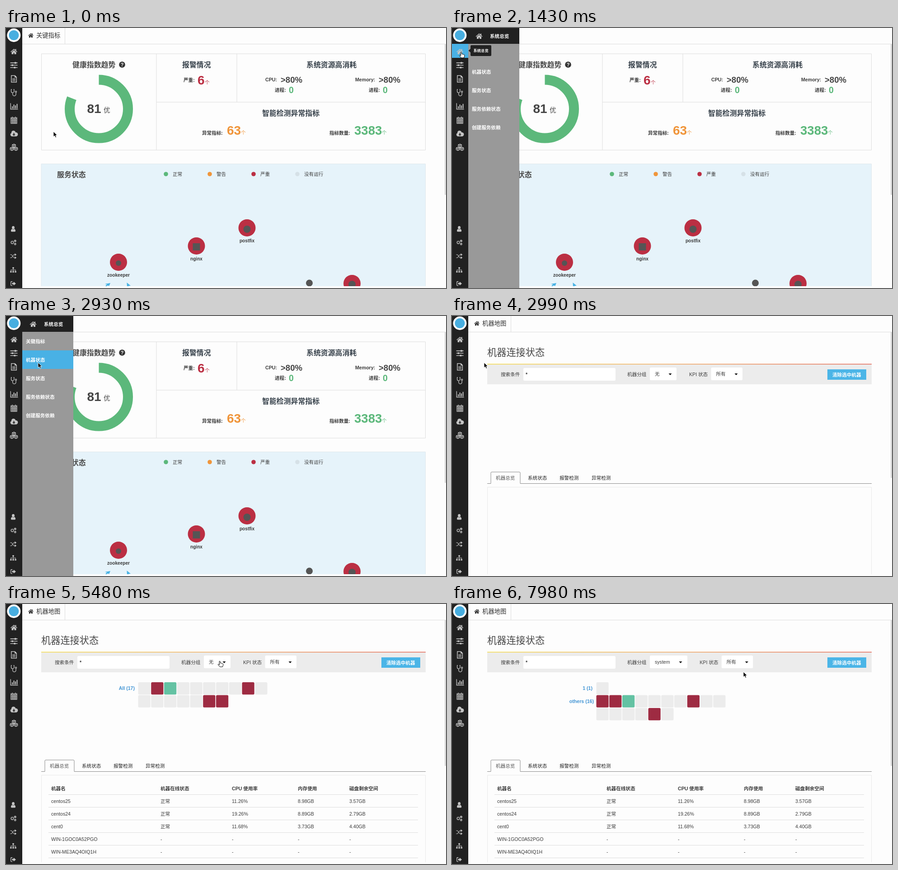
An HTML page for the animation above (8 s loop, 974 by 575 pixels).

```html
<!DOCTYPE html>
<html lang="zh-CN">
<head>
<meta charset="utf-8">
<title>系统总览</title>
<style>
html, body { margin: 0; width: 100%; height: 100%; overflow: hidden; background: #fdfdfd; }
svg { display: block; }
#stage { width: 974px; height: 575px; font: 10.6px "Liberation Sans", "Noto Sans CJK SC", "Noto Sans CJK", sans-serif; fill: #3a3a3a; }
.b { font-weight: bold; }
.m { font-weight: 500; }
.mid { text-anchor: middle; }
.end { text-anchor: end; }
.h { font-size: 15.9px; font-weight: bold; fill: #36404a; }
.tab { font-size: 13.3px; fill: #333; }
.num { font-size: 28px; font-weight: bold; }
.pct { font-size: 18.6px; font-weight: bold; fill: #444; }
.zero { font-size: 19.5px; font-weight: bold; }
.green { fill: #5cb87b; }
.orange { fill: #f0953a; }
.red { fill: #bb2f43; }
.white { fill: #fff; }
.line { fill: none; stroke: #ddd; }
.icon { color: #c4c4c4; fill: currentColor; fill-rule: evenodd; }
.icon .s { fill: none; stroke: currentColor; stroke-width: 1.3; }

/* Everything runs on one 8 s clock; 1% is 80 ms. */
.k { opacity: 0; animation: 8s step-end infinite; }
#home { animation-name: home; }
#machines { animation-name: machines; }
.late { animation-name: late; }
#menu { animation-name: menu; }
#hover { animation-name: hover; }
.tip { animation-name: tip; }
#none { animation-name: none-chosen; }
#system { animation-name: system-chosen; }
#drop { animation-name: drop; }
#pick { animation-name: pick; }
#all { animation-name: all; }
#ring { animation-name: ring; }
#grouped { animation-name: grouped; }
#arrow { animation-name: arrow; }
#hand { animation-name: hand; }
#beam { animation-name: beam; }
#kpi { animation: kpi 8s step-end infinite; }
#cursor { animation: move 8s linear infinite; }

@keyframes home { 0% { opacity: 1 } 37.375%, 100% { opacity: 0 } }
@keyframes machines { 37.375%, 100% { opacity: 1 } }
@keyframes late { 38.125%, 100% { opacity: 1 } }
@keyframes menu { 16.375% { opacity: 1 } 37.375%, 100% { opacity: 0 } }
@keyframes tip { 13.5% { opacity: 1 } 21.6%, 100% { opacity: 0 } }
@keyframes hover {
  21.6% { opacity: 1; transform: translateY(0) }
  23.25% { opacity: 1; transform: translateY(41px) }
  25.5% { opacity: 1; transform: translateY(82px) }
  26.7% { opacity: 1; transform: translateY(41px) }
  37.375%, 100% { opacity: 0 }
}
@keyframes none-chosen { 0% { opacity: 1 } 87.125%, 100% { opacity: 0 } }
@keyframes system-chosen { 87.125%, 100% { opacity: 1 } }
@keyframes kpi { 87.125%, 100% { transform: translateX(23.3px) } }
@keyframes drop { 73.25% { opacity: .6 } 74% { opacity: 1 } 87.125%, 100% { opacity: 0 } }
@keyframes pick {
  79.2% { opacity: 1; transform: translateY(0) }
  81% { opacity: 1; transform: translateY(19px) }
  87.125%, 100% { opacity: 0 }
}
@keyframes all { 0% { opacity: 1 } 90%, 100% { opacity: 0 } }
@keyframes ring { 87.75% { opacity: 1 } 90%, 100% { opacity: 0 } }
@keyframes grouped { 90%, 100% { opacity: 1 } }
@keyframes arrow {
  0% { opacity: 1 } 13.5% { opacity: 0 } 36.625% { opacity: 1 } 50.9% { opacity: 0 }
  65.3% { opacity: 1 } 67.1% { opacity: 0 } 90%, 100% { opacity: 1 }
}
@keyframes hand {
  13.5% { opacity: 1 } 36.625% { opacity: 0 } 67.1% { opacity: 1 } 90%, 100% { opacity: 0 }
}
@keyframes beam { 50.9% { opacity: 1 } 65.3%, 100% { opacity: 0 } }
@keyframes move {
  0%, 5.24% { transform: translate(105px, 229px) }
  5.25%, 7.5% { transform: translate(104px, 227px) }
  10.6% { transform: translate(60px, 140px) }
  12.5% { transform: translate(30px, 75px) }
  14.25%, 20.6% { transform: translate(20px, 53px) }
  22.5% { transform: translate(45px, 60px) }
  24.4% { transform: translate(62px, 100px) }
  26% { transform: translate(66px, 125px) }
  27.5% { transform: translate(66px, 108px) }
  29.25%, 32.9% { transform: translate(68px, 95px) }
  33.6%, 36.62% { transform: translate(71px, 95px) }
  36.625%, 41.74% { transform: translate(71px, 103px) }
  41.75%, 43.75% { transform: translate(77px, 102px) }
  44.75% { transform: translate(140px, 93px) }
  46.1% { transform: translate(280px, 128px) }
  46.87%, 47.6% { transform: translate(337px, 153px) }
  48.25% { transform: translate(345px, 163px) }
  49.75% { transform: translate(325px, 152px) }
  51.9% { transform: translate(296px, 135px) }
  53.5%, 62.5% { transform: translate(284px, 126px) }
  65% { transform: translate(350px, 124px) }
  66.6% { transform: translate(430px, 127px) }
  68.5%, 69.99% { transform: translate(473px, 126px) }
  70%, 77% { transform: translate(472px, 127px) }
  80% { transform: translate(452px, 155px) }
  81.9% { transform: translate(458px, 176px) }
  84.1%, 90% { transform: translate(470px, 181px) }
  93.75% { transform: translate(520px, 175px) }
  96.75% { transform: translate(610px, 157px) }
  99.7%, 100% { transform: translate(645px, 150px) }
}
</style>
</head>
<body>
<svg id="stage" viewBox="0 0 974 575">
  <defs>
    <path id="house" d="M8 2L.5 8.5l1 1L8 4l6.5 5.5 1-1L13 6.3V2.5h-2v2zM3 9.5V14h4v-3h2v3h4V9.5L8 5.3z"/>
    <linearGradient id="warm">
      <stop stop-color="#f3d834"/><stop offset=".45" stop-color="#f0a04a"/><stop offset="1" stop-color="#e0513d"/>
    </linearGradient>
    <clipPath id="view"><path d="M36 0h938v571H36z"/></clipPath>
  </defs>
  <rect width="974" height="575" fill="#fdfdfd"/>

  <g id="home" class="k" clip-path="url(#view)">
    <text x="67" y="21" class="tab">关键指标</text>
    <path d="M971 36h3v333h-3z" fill="#d9d9d9"/>
    <path d="M78.500 57H928.500V270H78.500zM333 57V270M511 57V164M333 164H928.500" class="line"/>

    <text x="147" y="87" class="h m" style="fill:#484848">健康指数趋势</text>
    <circle cx="257" cy="81" r="6.800" fill="#333"/>
    <text x="257" y="85" class="b mid white" font-size="11">?</text>
    <circle cx="205.500" cy="179" r="64.500" pathLength="100" transform="rotate(-90 205.500 179)" fill="none" stroke="#5cb87b" stroke-width="22" stroke-dasharray="81 19"/>
    <text x="179.500" y="188" class="num" fill="#444">81</text>
    <text x="216" y="187" class="m" font-size="14.500" fill="#444">优</text>

    <text x="390" y="86.500" class="h">报警情况</text>
    <text x="393" y="118.500" class="b">严重:</text>
    <text x="424" y="125" class="num red">6</text><text x="440" y="124" class="red">个</text>

    <text x="665" y="86.500" class="h">系统资源高消耗</text>
    <text x="574" y="118" class="b">CPU:</text><text x="608" y="121" class="pct">&gt;80%</text>
    <text x="595" y="141" class="b">进程:</text><text x="626" y="144" class="zero green">0</text>
    <text x="773" y="118" class="b">Memory:</text><text x="825" y="121" class="pct">&gt;80%</text>
    <text x="803" y="141" class="b">进程:</text><text x="834" y="144" class="zero green">0</text>

    <text x="567" y="194" class="h">智能检测异常指标</text>
    <text x="434" y="235.500" class="b">异常指标:</text>
    <text x="489" y="236" class="num orange">63</text><text x="520" y="235" class="orange">个</text>
    <text x="716" y="235.500" class="b">指标数量:</text>
    <text x="771" y="236" class="num green" style="font-size:27.600px">3383</text><text x="832" y="235" class="green">个</text>

    <path d="M78 300.500H928.500V575H78z" fill="#e6f3fa" stroke="#dfe8ed"/>
    <text x="113" y="329.500" class="h m" style="fill:#484848">服务状态</text>
    <g id="legend"></g>
    <g id="nodes"></g>
    <g fill="#555">
      <circle cx="249" cy="520" r="6"/>
      <rect x="413.500" y="476" width="16" height="16"/>
      <circle cx="533.500" cy="445" r="8"/>
      <circle cx="766" cy="567" r="8"/>
      <circle cx="671.500" cy="564" r="7.500"/>
    </g>
    <path d="M231 564l-12 2 4.500 1.500-5 4.500h4l3-3 2.500 2zM267.500 563l8.500 7-4 .3-4 4z" fill="#48b2e4"/>
  </g>

  <g id="machines" class="k" clip-path="url(#view)">
    <text x="67" y="21" class="tab">机器地图</text>
    <path d="M971 36h3v322h-3z" fill="#d9d9d9"/>
    <text x="78" y="87.500" font-size="21.200" fill="#484848">机器连接状态</text>
    <rect x="78" y="107" width="851" height="44" fill="#ececec"/>
    <rect x="78" y="105.800" width="851" height="1.300" fill="url(#warm)"/>
    <text x="108" y="132.500">搜索条件</text>
    <rect x="158" y="115" width="204" height="28" rx="2.500" class="white"/>
    <text x="163" y="133" class="b">*</text>
    <text x="388" y="132.500">机器分组</text>
    <g id="none" class="k">
      <rect x="438" y="114" width="59" height="28" rx="2.500" class="white"/>
      <text x="449" y="132">无</text><path d="M479.500 127h7l-3.500 4z" fill="#111"/>
    </g>
    <g id="system" class="k">
      <rect x="438" y="114" width="83" height="28" rx="2.500" class="white"/>
      <text x="449" y="132">system</text><path d="M502.500 127h7l-3.500 4z" fill="#111"/>
    </g>
    <g id="kpi">
      <text x="525" y="132.500">KPI 状态</text>
      <rect x="573.500" y="114" width="69.500" height="28" rx="2.500" class="white"/>
      <text x="584.500" y="132">所有</text><path d="M625.500 127h7l-3.500 4z" fill="#111"/>
    </g>
    <rect x="831" y="118" width="86" height="23" fill="#4bb5e7"/>
    <text x="842" y="133.500" class="b white">清除选中机器</text>

    <g class="k late">
      <g id="all" class="k b"></g>
      <rect id="ring" class="k" x="465.300" y="173" width="27" height="27" rx="2.500" fill="none" stroke="#5aa5dc"/>
      <g id="grouped" class="k b"></g>
    </g>

    <path d="M78 370.500H929" stroke="#888"/>
    <path d="M86 371V347a2 2 0 0 1 2-2h61a2 2 0 0 1 2 2v24" fill="#fdfdfd" stroke="#888"/>
    <path d="M86.500 370.500h64" stroke="#fdfdfd" stroke-width="2"/>
    <text x="97" y="361.500" fill="#555">机器总览</text>
    <g class="m" fill="#222"><text x="168" y="361.500">系统状态</text><text x="238" y="361.500">报警检测</text><text x="309" y="361.500">异常检测</text></g>
    <path d="M78.500 580V378.500H928.500V580" class="line" style="stroke:#e9e9e9"/>
    <g id="table" class="k late"></g>

    <g id="drop" class="k">
      <rect x="414.500" y="144.500" width="106" height="45" rx="2.500" fill="#fff" stroke="#ccc"/>
      <rect id="pick" class="k" x="415" y="148" width="105" height="19" fill="#eee"/>
      <text x="429" y="161.500">无</text><text x="429" y="180.500">system</text>
    </g>
  </g>

  <path d="M36 35.500H974M130.500 0V35" class="line"/>
  <use href="#house" class="icon" style="color:#333" transform="translate(48.500 10) scale(.8)"/>

  <rect width="36" height="575" fill="#212121"/>
  <g id="menu" class="k">
    <rect x="36" width="113" height="35" fill="#212121"/>
    <use href="#house" class="icon" transform="translate(52 10)"/>
    <text x="84" y="22" class="b white">系统总览</text>
    <rect x="36" y="35" width="113" height="540" fill="#999"/>
    <rect id="hover" class="k" x="36" y="35" width="113" height="41" fill="#49b1e5"/>
    <g id="items" class="b white"></g>
  </g>
  <rect class="k tip" y="35" width="36" height="31" fill="#49b1e5"/>
  <g id="icons" class="icon"></g>
  <circle cx="17.300" cy="16" r="13" fill="#48aee0" stroke="#fff" stroke-width="4"/>
  <g class="k tip">
    <path d="M36.500 50l4.500-4V40a2 2 0 0 1 2-2H85a2 2 0 0 1 2 2V60a2 2 0 0 1-2 2H43a2 2 0 0 1-2-2V54z" fill="#222"/>
    <text x="47.500" y="53" class="b white" font-size="8.300">系统总览</text>
  </g>

  <g id="cursor" stroke-linejoin="round">
    <path id="arrow" class="k" d="M0 0V11.500L2.700 9 4.500 13.300 6.600 12.400 4.800 8.300H8.300z" fill="#000" stroke="#fff" stroke-width=".9"/>
    <path id="hand" class="k" d="M-1 1.200C-1 0 1 0 1.200 1.200L1.800 5c.5-.8 1.800-.5 2 .4.700-.7 1.800-.4 2 .5.900-.4 1.900.1 1.900 1.200V9.500L6.300 13H.5L-3.600 8.300c-.6-1 .8-1.900 1.700-.9l1.400 1.300z" fill="#fff" stroke="#000"/>
    <path id="beam" class="k" d="M-2.500-6.500Q0-6.500 0-4.500Q0-6.500 2.500-6.500M0-5V5M-2.500 6.500Q0 6.500 0 4.500Q0 6.500 2.500 6.500" fill="none" stroke="#222"/>
  </g>
</svg>
<script>
const fill = (id, parts) => { document.getElementById(id).innerHTML = parts.join(''); };
const text = (x, y, s, cls = '') => `<text x="${x}" y="${y}" class="${cls}">${s}</text>`;

fill('legend', [['正常', '#5cb87b'], ['警告', '#f0953a'], ['严重', '#bb2f43'], ['没有运行', '#d6e1e7']].map(([s, c], i) =>
  `<circle cx="${354 + 97 * i}" cy="323" r="4.800" fill="${c}"/>` + text(369 + 97 * i, 327, s, 'm')));

fill('nodes', [[249, 518, 'zookeeper'], [421.500, 482, 'nginx'], [533.500, 442, 'postfix'], [766, 565, '']].map(([x, y, s]) =>
  `<circle cx="${x}" cy="${y}" r="19" class="red"/><g font-size="10.100">${text(x, y + 32, s, 'mid b')}</g>`));

fill('items', ['关键指标', '机器状态', '服务状态', '服务依赖状态', '创建服务依赖'].map((s, i) => text(44, 59.500 + 41 * i, s)));

// Cell rows: "-" idle, "r" critical, "g" healthy.
const tones = { '-': '#ececec', r: '#9e2b42', g: '#64c2a3' };
const cells = (x, rows) => rows.map((row, j) => [...row].map((c, i) =>
  `<rect x="${x + 28.750 * i}" y="${173 + 28.500 * j}" width="27.200" height="27.200" rx="2.500" fill="${tones[c]}"/>`).join('')).join('');
const label = (x, y, s) => `<g fill="#4094d4">${text(x, y, s, 'end')}</g>`;
fill('all', [label(285, 190, 'All (17)'), cells(292.500, ['-rg-----r-', '-----rr'])]);
fill('grouped', [label(311, 190, '1 (1)'), label(314, 219, 'others (16)'), cells(319.500, ['-', 'rrg----r--', '----r-'])]);

const columns = [100, 342, 500, 646, 760];
const rows = [
  ['机器名', '机器在线状态', 'CPU 使用率', '内存使用', '磁盘剩余空间'],
  ['centos25', '正常', '11.26%', '8.98GB', '3.57GB'],
  ['centos24', '正常', '19.26%', '8.89GB', '2.79GB'],
  ['cent0', '正常', '11.68%', '3.73GB', '4.40GB'],
  ['WIN-1GOC0A52PGO', '-', '-', '-', '-'],
  ['WIN-ME3AQ4OIQ1H', '-', '-', '-', '-'],
];
fill('table', rows.map((row, j) =>
  row.map((s, i) => text(columns[i], 411.500 + 28 * j, s, j ? '' : 'b')).join('') +
  `<path d="M94 ${421.500 + 28 * j}H912" class="line"/>`));

const cube = (x, y) => `M${x} ${y}l3.600 1.600v4l-3.600 1.800-3.600-1.800v-4zm-3.600 1.600l3.600 1.700 3.600-1.700m-3.600 1.700v4`;
const gear = (x, y, r) => {
  let d = `M${x - r} ${y}a${r} ${r} 0 1 1 ${2 * r} 0a${r} ${r} 0 1 1 ${-2 * r} 0`;
  for (let i = 0; i < 8; i++) {
    const c = Math.cos(i * Math.PI / 4), s = Math.sin(i * Math.PI / 4);
    d += `M${x + r * c} ${y + r * s}l${1.700 * c} ${1.700 * s}`;
  }
  return d;
};
const solid = d => `<path d="${d}"/>`;
const stroke = d => `<path class="s" d="${d}"/>`;
const top8 = [
  '<use href="#house"/>',
  solid('M0 2h9.500V1h3.500v1h3v1.600h-3v1H9.500v-1H0zM0 7.200h3v-1h3.500v1H16v1.600H6.500v1H3v-1H0zM0 12.400h8v-1h3.500v1H16V14h-4.500v1H8v-1H0z'),
  solid('M1.500 0h9l4 4v12h-13zM3 1.500v13h10V5H9.500V1.500zM4.500 7h7v1.200h-7zM4.500 9.400h7v1.200h-7zM4.500 11.800h7V13h-7z'),
  stroke('M3.500 1H2v4a3.200 3.200 0 0 0 6.400 0V1H7M5.200 8.500v3a3.500 3.500 0 0 0 7.300 0V7.500M11 6a1.500 1.500 0 1 1 3 0a1.500 1.500 0 1 1-3 0'),
  solid('M0 1h1.400v12.600H17V15H0zM3.500 8h2v4.500h-2zM7 4h2v8.500H7zM10.500 6h2v6.500h-2zM14 2.500h2v10h-2z'),
  stroke('M1.500 3h13v12.500h-13zM1.500 5.500h13M1.500 9h13M1.500 12.300h13M5 5.500v10M8.200 5.500v10M11.300 5.500v10M4.500 .5v3M11.500 .5v3'),
  solid('M4 14a4 4 0 0 1-1.500-7.600A4.600 4.600 0 0 1 11.600 5 4.500 4.500 0 0 1 13 14zM7 6.500v3H4.800L8 12.800l3.200-3.300H9v-3z'),
  stroke(cube(8, .5) + cube(3.500, 7.500) + cube(12.500, 7.500)),
];
const low5 = [
  solid('M8 1a3.500 4 0 0 1 0 8a3.500 4 0 0 1 0-8zM2 14c0-4 2-5.500 3.300-5.500a4 4 0 0 0 5.400 0C12 8.500 14 10 14 14c0 1-1 1.500-2 1.500H4c-1 0-2-.5-2-1.500z'),
  stroke(gear(5.500, 8, 3) + gear(13, 4, 1.500) + gear(13, 12, 1.500)),
  stroke('M0 4h3.500l6 8H14M0 12h3.500l6-8H14M12.500 2l3 2-3 2zM12.500 10l3 2-3 2z'),
  solid('M6 1h4v4H8.600v2.400h6V11H16v4h-4v-4h1.400V8.600H8.600V11H10v4H6v-4h1.400V8.600H2.600V11H4v4H0v-4h1.400V7.400h6V5H6z'),
  solid('M6 2H3a2 2 0 0 0-2 2v8a2 2 0 0 0 2 2h3v-1.500H3.500a1 1 0 0 1-1-1v-7a1 1 0 0 1 1-1H6zM5 6h4V3l6 5-6 5v-3H5z'),
];
const place = (list, x, y, k) => list.map((s, i) =>
  `<g transform="translate(${x - 8 * k} ${y + 30.300 * i - 8 * k}) scale(${k})">${s}</g>`).join('');
fill('icons', [place(top8, 17.500, 52, 1), place(low5, 16, 444, .85)]);
</script>
</body>
</html>
```
